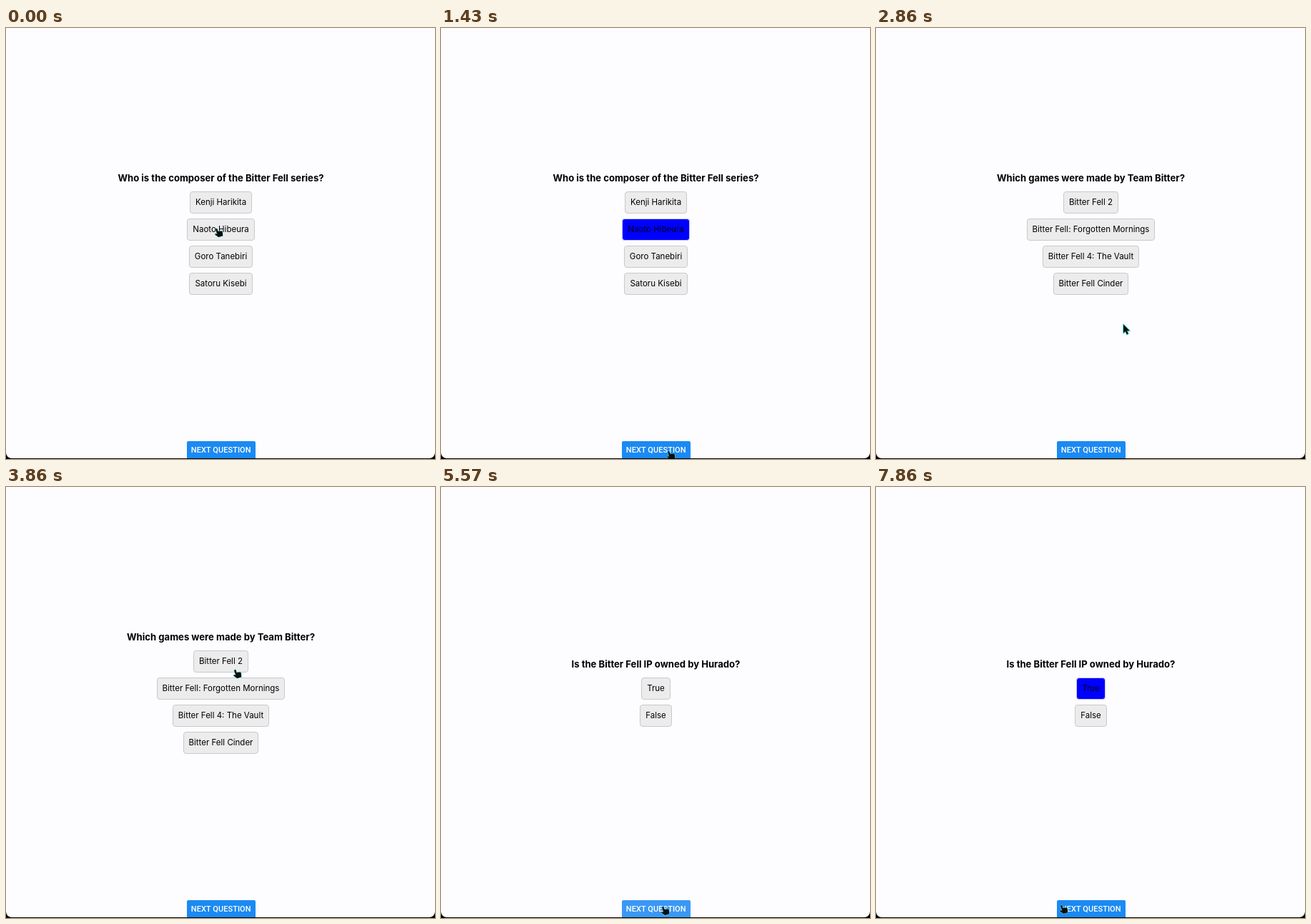
Recreate the animation shown at these times as an HTML page. Size 600 px wide and 604 px high, loop 8000 ms.

```html
<!DOCTYPE html>
<html lang="en">
<head>
<meta charset="utf-8">
<title>Quiz</title>
<style>
  html, body { margin: 0; width: 100%; height: 100%; overflow: hidden; background: #000; }
  #page {
    position: absolute; left: 0; top: 0; width: 600px; height: 603px; overflow: hidden;
    background: #fdfcfe; border-radius: 0 0 8px 8px;
    font-family: Inter, "Open Sans", sans-serif; color: #000;
  }
  .quiz {
    position: absolute; left: 0; top: 0; width: 601px; height: 583px; display: none;
    flex-direction: column; align-items: center; justify-content: center; white-space: nowrap;
  }
  .quiz.show { display: flex; }
  .quiz h1 { margin: 0 0 10px; font-size: 13.1px; line-height: 17px; font-weight: 700; }
  .answer {
    box-sizing: border-box; height: 30.5px; margin-bottom: 7.5px; padding: 0 7px;
    border: 1px solid #c9c8cc; border-radius: 4px; background: #ececed;
    font-size: 11.5px; line-height: 29px;
  }
  .answer.on { background: #00f; border-color: #c9c9f4; color: #000018; }
  #next {
    position: absolute; left: 252.5px; top: 579px; width: 96.5px; height: 24px;
    border-radius: 2px 2px 0 0; background: #1b8af2; color: #fff;
    font: 500 11px/25px Roboto, sans-serif; letter-spacing: .07px; text-align: center;
  }
  #next.lit { background: #3a98f4; }
  svg { position: absolute; left: 0; top: 0; overflow: visible; }
  path { fill: #0a0e10; stroke: #62dccd; stroke-width: 2; stroke-linejoin: round; paint-order: stroke; }
  #hand { stroke-opacity: .6; stroke-width: 1.5; transform: rotate(-18deg); }
</style>
</head>
<body>
<div id="page">
  <div id="next">NEXT QUESTION</div>
  <svg id="cursor" width="1" height="1">
    <path id="arrow" d="M0 0V12L2.8 9.6 4.8 14 6.8 13 4.9 8.8H8.6Z"/>
    <path id="hand" d="M-1.2 1Q0-.8 1.2 1V4.5L6 5.6Q7 6 6.8 7.6L5.6 12.5H-.6L-4 7.8Q-4 6-2.4 6.8L-1.2 8Z"/>
  </svg>
</div>
<script>
const LOOP = 8000, FPS = 7, STEPS = LOOP * FPS / 1000;

// picks: answer index -> step at which it is chosen
const quizzes = [
  { from: 0, title: 'Who is the composer of the Bitter Fell series?', picks: { 1: 2 },
    answers: ['Kenji Harikita', 'Naoto Hibeura', 'Goro Tanebiri', 'Satoru Kisebi'] },
  { from: 13, title: 'Which games were made by Team Bitter?', picks: { 0: 29, 2: 33 },
    answers: ['Bitter Fell 2', 'Bitter Fell: Forgotten Mornings', 'Bitter Fell 4: The Vault', 'Bitter Fell Cinder'] },
  { from: 38, title: 'Is the Bitter Fell IP owned by Hurado?', picks: { 0: 51 },
    answers: ['True', 'False'] }
];

// Pointer path: step, x, y
const stops = [
  [2, 294, 281], [10, 318, 593], [14, 316, 583], [16, 316, 583], [19, 365, 440], [24, 183, 204],
  [27, 320, 256], [29, 306, 246], [33, 310, 318], [35.3, 312, 588], [39, 310, 588],
  [43, 151, 400], [46, 380, 263], [50, 285, 276], [55, 259, 586]
];

const $ = id => document.getElementById(id);
const page = $('page'), next = $('next'), cursor = $('cursor');

function make(tag, text, cls = '') {
  const el = document.createElement(tag);
  el.textContent = text;
  el.className = cls;
  return el;
}

for (const quiz of quizzes) {
  quiz.el = make('div', '', 'quiz');
  quiz.boxes = quiz.answers.map(label => make('div', label, 'answer'));
  quiz.el.append(make('h1', quiz.title), ...quiz.boxes);
  page.insertBefore(quiz.el, next);
}

function pointer(step) {
  const i = stops.findIndex(s => s[0] >= step);
  const [b, bx, by] = stops[i];
  if (i === 0) return [bx, by];
  const [a, ax, ay] = stops[i - 1];
  const u = (step - a) / (b - a), e = u * u * (3 - 2 * u);
  return [ax + (bx - ax) * e, ay + (by - ay) * e];
}

function covers(el, x, y) {
  const r = el.getBoundingClientRect();
  return x >= r.left && x <= r.right && y >= r.top && y <= r.bottom;
}

function draw(step) {
  const now = quizzes.filter(q => q.from <= step).pop();
  for (const q of quizzes) q.el.classList.toggle('show', q === now);
  now.boxes.forEach((el, i) => el.classList.toggle('on', step >= now.picks[i]));
  next.classList.toggle('lit', now.from > 0 && step - now.from < 4);

  const [x, y] = pointer(step);
  const over = [next, ...now.boxes].some(el => covers(el, x, y));
  cursor.style.transform = `translate(${x}px, ${y}px)`;
  $('hand').style.display = over ? '' : 'none';
  $('arrow').style.display = over ? 'none' : '';
}

const start = performance.now();
function tick() {
  const t = (performance.now() - start) % LOOP;
  draw(Math.min(STEPS - 1, Math.floor((t + 3) * FPS / 1000)));
  requestAnimationFrame(tick);
}
tick();
</script>
</body>
</html>
```
